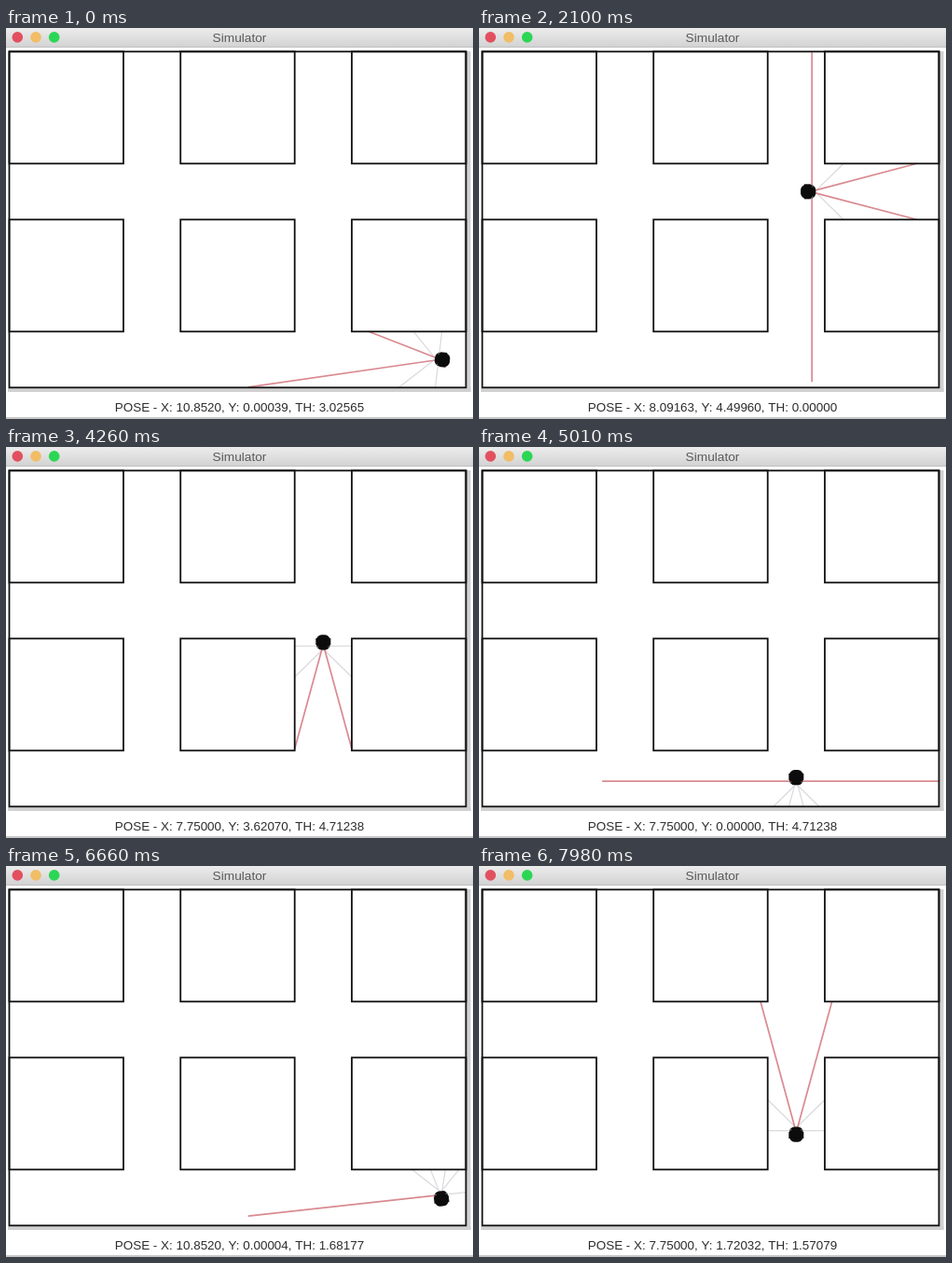
These frames come from a looping animation (501x419 px, 8000 ms). An HTML page with a canvas:

```html
<!DOCTYPE html>
<html lang="en">
<head>
<meta charset="utf-8">
<title>Simulator</title>
<style>
  html, body { margin: 0; width: 100%; height: 100%; overflow: hidden; background: #fff; }
  canvas { display: block; width: 501px; height: 419px; }
</style>
</head>
<body>
<canvas id="stage"></canvas>
<script>
const W = 501, H = 419, LOOP = 8000, STEP = 30;
const { PI } = Math;
const canvas = document.getElementById('stage');
const ctx = canvas.getContext('2d');
const ratio = window.devicePixelRatio || 1;
canvas.width = W * ratio;
canvas.height = H * ratio;
ctx.scale(ratio, ratio);

// World units to stage pixels
const toX = x => 23.9 + 40.83 * x;
const toY = y => 355.3 - 40 * y;

// The robot patrols A, B, C, D and back: on each leg it waits, turns, then drives
const A = { x: 10.852, y: 0 }, B = { x: 7.75, y: 0 };
const C = { x: 7.75, y: 4.5 }, D = { x: 10.852, y: 4.5 };
const MS_PER_UNIT = 187, MS_PER_RADIAN = 138, EASTWARD_WAIT = 165;

function leg(from, to, startTh, endTh, wait = 0) {
  const turn = Math.abs(endTh - startTh) * MS_PER_RADIAN;
  const drive = Math.hypot(to.x - from.x, to.y - from.y) * MS_PER_UNIT;
  return { from, to, startTh, endTh, wait, turn, drive, total: wait + turn + drive };
}

const patrol = [
  leg(A, B, 0, PI, 529),
  leg(B, C, PI, PI / 2),
  leg(C, D, PI / 2, 0, EASTWARD_WAIT),
  leg(D, C, 0, PI, 249),
  leg(C, B, PI, 1.5 * PI),
  leg(B, A, 1.5 * PI, 2 * PI, EASTWARD_WAIT)
];
const PERIOD = patrol.reduce((sum, { total }) => sum + total, 0);
// The loop opens just before the first turn is complete
const OPENING = patrol[0].wait + patrol[0].turn - 16;

const clamp = v => Math.min(1, Math.max(0, v));
const mix = (a, b, k) => a + (b - a) * k;

function poseAt(time) {
  let t = (time + OPENING) % PERIOD, i = 0;
  while (t >= patrol[i].total) t -= patrol[i++].total;
  const { from, to, startTh, endTh, wait, turn, drive } = patrol[i];
  const turned = clamp((t - wait) / turn);
  const driven = clamp((t - wait - turn) / drive);
  const th = mix(startTh, endTh, turned);
  const drift = -0.0004 * Math.cos(th);
  return { x: mix(from.x, to.x, driven), y: mix(from.y, to.y, driven) + drift, th };
}

// Rectangles in world units: the arena and its six blocks
const rects = [{ l: -0.5, b: -0.75, r: 11.5, t: 8.25 }];
for (let col = 0; col < 3; col++)
  for (let row = 0; row < 2; row++) {
    const l = -0.5 + 4.5 * col, b = 0.75 + 4.5 * row;
    rects.push({ l, b, r: l + 3, t: b + 3 });
  }

// Range sensors, in mirrored pairs around the heading
const sensors = [
  { deg: 90, ahead: 0.07, side: 0.1 },
  { deg: 45, ahead: 0.15, side: 0 },
  { deg: 15, ahead: 0.12, side: 0.025 }
];
const MAX_RANGE = 5, FAR = 1.5;

function castRay(x, y, angle) {
  const dx = Math.cos(angle), dy = Math.sin(angle);
  let range = MAX_RANGE;
  for (const { l, b, r, t } of rects) {
    for (const wall of [l, r]) {
      const d = (wall - x) / dx, hit = y + d * dy;
      if (d > 0 && d < range && hit >= b && hit <= t) range = d;
    }
    for (const wall of [b, t]) {
      const d = (wall - y) / dy, hit = x + d * dx;
      if (d > 0 && d < range && hit >= l && hit <= r) range = d;
    }
  }
  return { range, x: x + dx * range, y: y + dy * range };
}

function fill(color, x, y, w, h) {
  ctx.fillStyle = color;
  ctx.fillRect(x, y, w, h);
}

function disc(color, x, y, r) {
  ctx.fillStyle = color;
  ctx.beginPath();
  ctx.arc(x, y, r, 0, 2 * PI);
  ctx.fill();
}

function label(text, y, size, color) {
  ctx.font = `${size}px "Liberation Sans", Arial, sans-serif`;
  ctx.textAlign = 'center';
  ctx.fillStyle = color;
  ctx.fillText(text, 250.5, y);
}

function drawWindow() {
  fill('#fff', 0, 0, W, H);
  const bar = ctx.createLinearGradient(0, 0, 0, 20);
  bar.addColorStop(0, '#ececec');
  bar.addColorStop(1, '#d3d3d3');
  fill(bar, 0, 0, W, 20);
  fill('#c0c0c0', 0, 20, W, 1);
  ['#e2505f', '#f1bd66', '#2bd655'].forEach((color, i) => disc(color, 12.3 + 19.7 * i, 9.9, 5.8));
  label('Simulator', 14.6, 13.7, '#5a5a5a');
  fill('#d0d0d0', 494, 25, 4.5, 365);
  fill('#d0d0d0', 2, 386, 496.5, 4);
  fill('#c8c8c8', 0, 417, W, 2);
}

function drawWalls() {
  ctx.strokeStyle = '#111';
  ctx.lineWidth = 1.8;
  for (const { l, b, r, t } of rects)
    ctx.strokeRect(toX(l), toY(t), toX(r) - toX(l), toY(b) - toY(t));
}

function drawRay({ x, y, th }, { deg, ahead, side }, hand) {
  const c = Math.cos(th), s = Math.sin(th);
  const sx = x + ahead * c - hand * side * s;
  const sy = y + ahead * s + hand * side * c;
  const end = castRay(sx, sy, th + hand * deg * PI / 180);
  const far = end.range > FAR;
  ctx.strokeStyle = far ? '#d98a90' : '#d9d9de';
  ctx.lineWidth = far ? 1.7 : 1.2;
  ctx.beginPath();
  ctx.moveTo(toX(sx), toY(sy));
  ctx.lineTo(toX(end.x), toY(end.y));
  ctx.stroke();
}

function drawRobot({ x, y, th }) {
  ctx.save();
  ctx.translate(toX(x), toY(y));
  ctx.rotate(-th);
  ctx.fillStyle = '#0c0c0c';
  ctx.beginPath();
  ctx.roundRect(-9.2, -7.3, 16.2, 14.6, 5.5);
  ctx.fill();
  fill('#0c0c0c', -5.5, -8, 7, 16);
  for (const side of [-6, 6]) fill('#8a8a8a', 3.2, side - 1, 1, 2);
  ctx.restore();
}

const show = v => v.toFixed(8).slice(0, 7);

function draw(time) {
  const pose = poseAt(time);
  drawWindow();
  for (const sensor of sensors)
    for (const hand of [1, -1]) drawRay(pose, sensor, hand);
  drawWalls();
  drawRobot(pose);
  label(`POSE - X: ${show(pose.x)}, Y: ${show(pose.y)}, TH: ${show(pose.th)}`, 410.7, 13.44, '#2c2c2c');
}

let start;
function tick(now) {
  start ??= now;
  const time = (now - start) % LOOP;
  draw(Math.floor(time / STEP) * STEP);
  requestAnimationFrame(tick);
}
draw(0);
requestAnimationFrame(tick);
</script>
</body>
</html>
```
